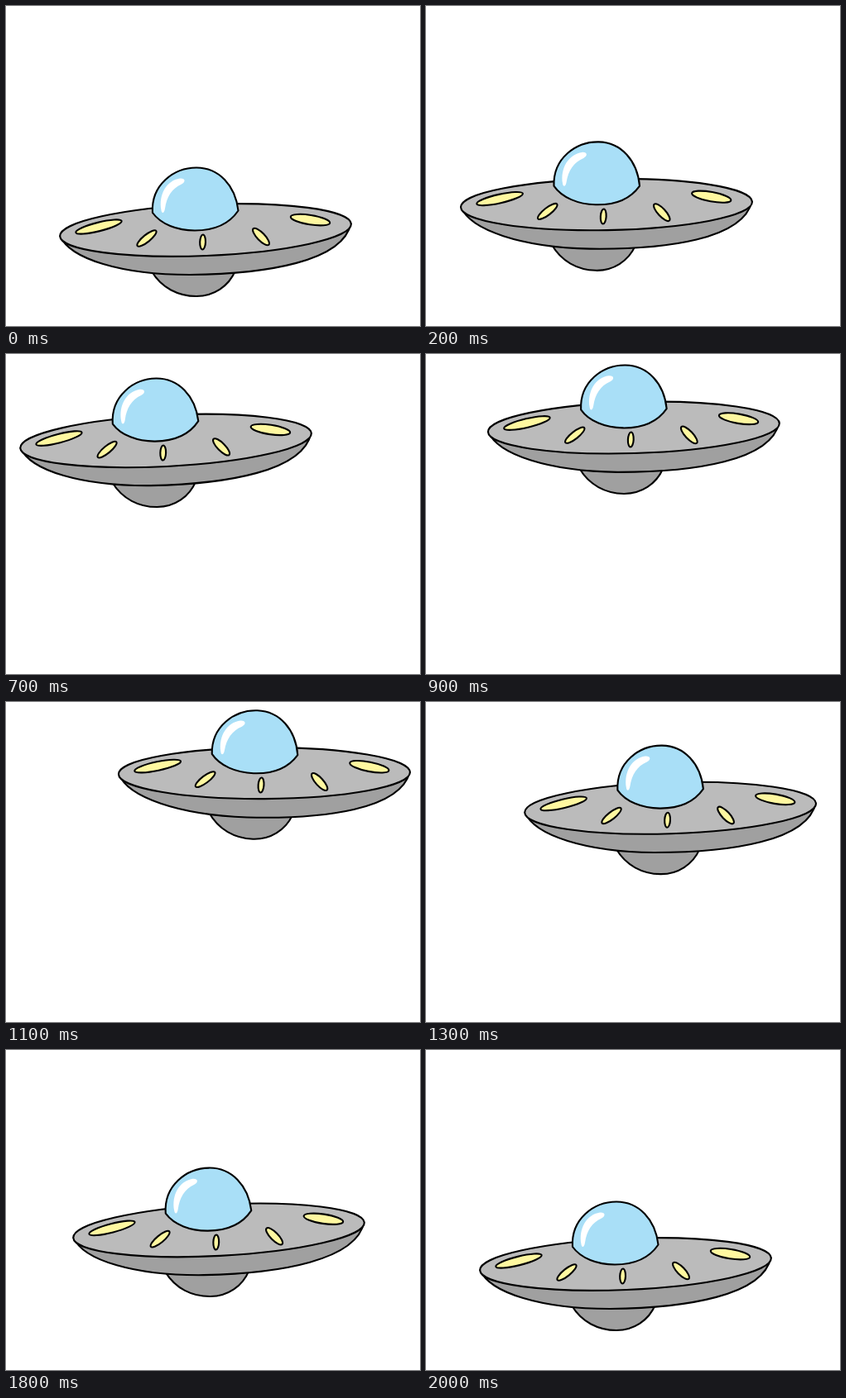
An HTML page with a canvas that plays this animation: 500 by 387 pixels, repeating every 2100 ms.

```html
<!DOCTYPE html>
<html lang="en">
<head>
<meta charset="utf-8">
<title>Flying saucer</title>
<style>
  html, body { margin: 0; width: 100%; height: 100%; overflow: hidden; background: #fff; }
  canvas { display: block; }
</style>
</head>
<body>
<canvas id="stage" width="500" height="387"></canvas>
<script>
const ctx = document.getElementById('stage').getContext('2d');
const LOOP = 2100, STEP = 100;
const PIVOT = { x: 237, y: 270 };
const rad = deg => deg * Math.PI / 180;

// Key poses of the flight: time, x, y, tilt in degrees.
const keys = [
  [0, 0, 0, 0],
  [200, -23, -31, 1.35],
  [500, -52.5, -111, 0.4],
  [700, -48, -166, -0.5],
  [1100, 71, -185, 2.05],
  [1200, 71, -163, 1.6],
  [1500, 20, -104, -1.1],
  [1800, 16, -53, -0.6],
  [2000, 0, -12, 0]
];

// Key i of the endless loop, with its time shifted by whole loops.
function keyAt(i) {
  const n = keys.length, turn = Math.floor(i / n);
  const [t, ...pose] = keys[i - turn * n];
  return { t: t + turn * LOOP, pose };
}

// Smooth curve through the key poses.
function poseAt(t) {
  const i = keys.findLastIndex(k => k[0] <= t);
  const [a, b, c, d] = [i - 1, i, i + 1, i + 2].map(keyAt);
  const span = c.t - b.t, s = (t - b.t) / span;
  return b.pose.map((from, j) => {
    const to = c.pose[j];
    const m0 = span * (to - a.pose[j]) / (c.t - a.t);
    const m1 = span * (d.pose[j] - from) / (d.t - b.t);
    return from + s * s * (3 - 2 * s) * (to - from)
      + s * (1 - s) * ((1 - s) * m0 - s * m1);
  });
}

function oval(x, y, rx, ry, deg) {
  const p = new Path2D();
  p.ellipse(x, y, rx, ry, rad(deg), 0, Math.PI * 2);
  return p;
}

const bulb = new Path2D('M176 321 C188 341 208 351 230 351 C251 351 269 339 277 320 Z');
const hull = new Path2D('M65.5 278 C77 306 140 325 222 325 C315 324 407 309 416.5 263 Z');
const dome = new Path2D('M177 250 C175 216 203 195.5 230 195.5 C257 195.5 277 217 280.5 247.5 ' +
  'C270 263 252 271.5 228 271.5 C207 271.5 187 264 177 250 Z');
const shine = new Path2D('M187.5 247 C184 228 194 211 210 208.5 C217 208 217 213 212 215.5 ' +
  'C200 221 194 231 192 245 C191 251.5 188 251 187.5 247 Z');
const deck = oval(241, 271, 176, 31, -2.4);
const lights = [
  oval(112, 267, 28.5, 5.3, -14),
  oval(170, 281, 14.5, 4.3, -39),
  oval(237.6, 285.5, 9, 3.4, 92),
  oval(308, 279, 13.5, 4.6, 46),
  oval(367.5, 258.6, 24, 5.7, 9)
];

function paint(path, fill) {
  ctx.fillStyle = fill;
  ctx.fill(path);
  ctx.stroke(path);
}

function drawSaucer(x, y, tilt) {
  ctx.save();
  ctx.translate(PIVOT.x + x, PIVOT.y + y);
  ctx.rotate(rad(tilt));
  ctx.translate(-PIVOT.x, -PIVOT.y);
  ctx.strokeStyle = '#000';
  ctx.lineWidth = 2.1;
  ctx.lineJoin = 'round';
  paint(bulb, '#a0a0a0');
  paint(hull, '#a0a0a0');
  paint(deck, '#bbb');
  for (const light of lights) paint(light, '#fff8a0');
  paint(dome, '#a9dff7');
  ctx.fillStyle = '#fff';
  ctx.fill(shine);
  ctx.restore();
}

function frame() {
  const t = performance.now() % LOOP;
  ctx.fillStyle = '#fff';
  ctx.fillRect(0, 0, 500, 387);
  drawSaucer(...poseAt(Math.floor(t / STEP) * STEP));
  requestAnimationFrame(frame);
}
frame();
</script>
</body>
</html>
```
